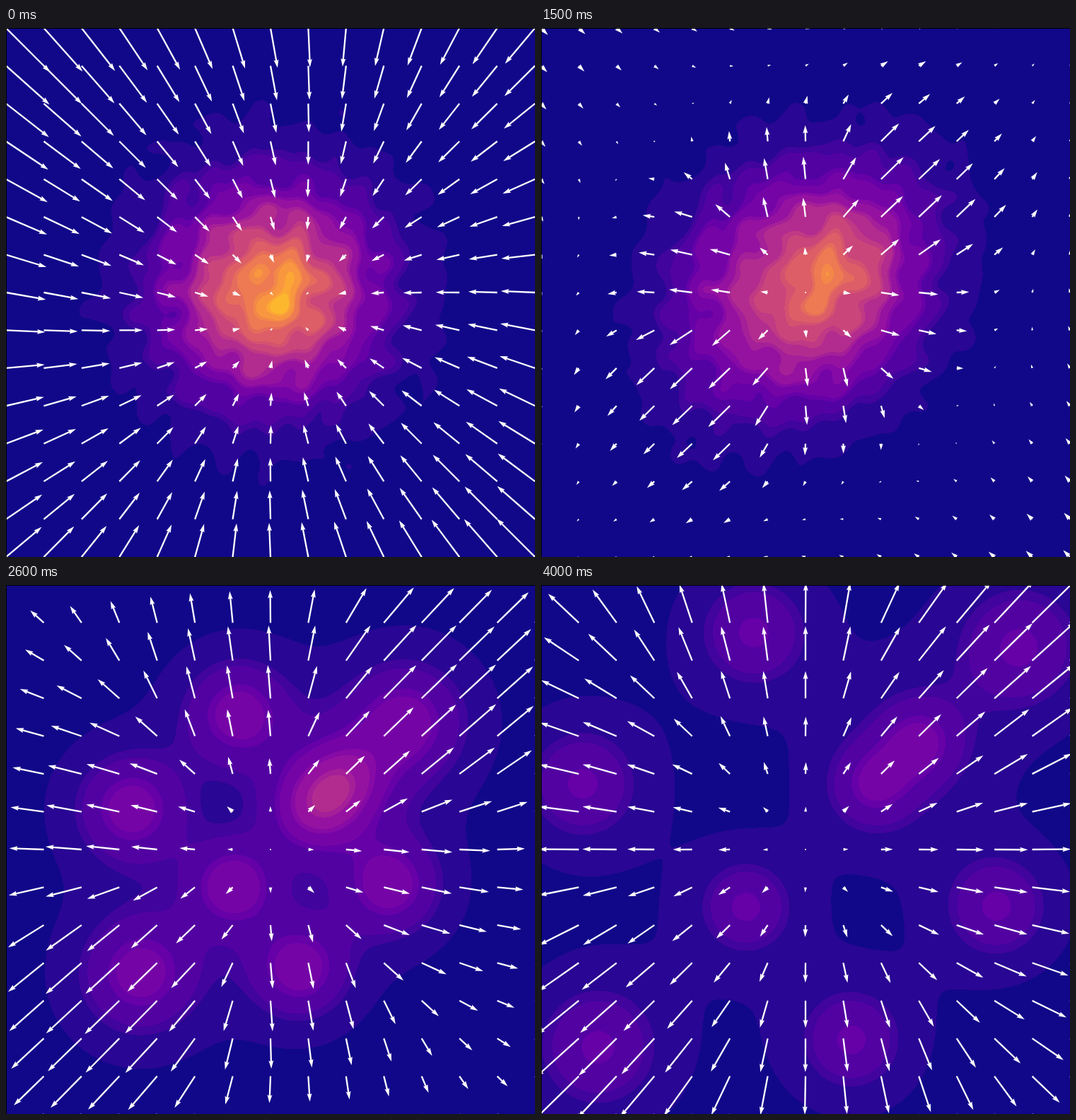
Animation of 748 by 748 pixels, one loop 4.1 s. Source, as an HTML page with a canvas:

```html
<!DOCTYPE html>
<html lang="en">
<head>
<meta charset="utf-8">
<title>Collapse and outflow</title>
<style>
html, body { margin: 0; width: 100%; height: 100%; overflow: hidden; background: #110588; }
canvas { display: block; }
</style>
</head>
<body>
<canvas id="stage" width="748" height="748"></canvas>
<script>
const SIZE = 748, MID = SIZE / 2, CELLS = 14, STEP = SIZE / CELLS;
const LOOP = 4100, TICK = 100, BASE_SIGMA = 48, PEAK = .19;
const { exp, hypot, sqrt, cos, sin, atan2, floor, PI } = Math;
const ctx = document.getElementById('stage').getContext('2d');
const image = ctx.createImageData(SIZE, SIZE);
const pixels = new Uint32Array(image.data.buffer);
const field = new Float32Array(SIZE * SIZE);

// Six evenly turned arms, clockwise from east: radii of the clumps on each
const arms = [[278], [273], [400, 115], [325], [312], [412, 220, 130]].map((radii, i) => {
  const angle = (16.5 + 60 * i) * PI / 180;
  return { radii, angle, x: cos(angle), y: sin(angle) };
});

const clamp = (v, low, high) => Math.max(low, Math.min(high, v));
const lerp = (a, b, f) => a + (b - a) * f;
// Rises to 1 at x = 1, then decays
const pulse = x => x > 0 ? x * exp(1 - x) : 0;

// Distance of the clumps from the centre: fall in, bounce, coast out
const spreadAt = t => hypot(.00027 * t - .07, .08);
const sigmaAt = t => 40 + 8 * spreadAt(t) + 41 / (1 + exp((t - 1350) / 350)) + 9 * exp(-t / 300);

let seed = 11;
function random() {
  seed = (seed * 16807) % 2147483647;
  return seed / 2147483647;
}

function makeNoise() {
  const waves = Array.from({ length: 12 }, () => {
    const angle = random() * PI * 2, k = 2 * PI / (38 + random() * 50);
    return [k * cos(angle), k * sin(angle), random() * 7];
  });
  const bumps = [[385, 392, 1.9], [399, 351, 1.1], [308, 384, .7]];
  return Float32Array.from(field, (_, i) => {
    const x = i % SIZE, y = floor(i / SIZE);
    let n = 0;
    for (const [kx, ky, phase] of waves) n += .36 * sin(kx * x + ky * y + phase);
    for (const [bx, by, peak] of bumps) n += peak * exp(-((x - bx) ** 2 + (y - by) ** 2) / 700);
    return n;
  });
}

const plasma = [0x0d0887, 0x41049d, 0x6a00a8, 0x8f0da4, 0xb12a90, 0xcc4778,
  0xe16462, 0xf2844b, 0xfca636, 0xfcce25, 0xf0f921];

function plasmaPixel(v) {
  const p = clamp(v, 0, 1) * 10, i = Math.min(9, floor(p));
  const channel = shift => Math.round(lerp(plasma[i] >> shift & 255, plasma[i + 1] >> shift & 255, p - i));
  return (255 << 24 | channel(0) << 16 | channel(8) << 8 | channel(16)) >>> 0;
}

// Filled contours: narrow and wide bands alternate above the two lowest levels
function bandValue(v) {
  if (v < .03) return .008;
  if (v < .088) return .054;
  const base = .088 + floor((v - .088) / .0875) * .0875;
  return base + (v - base < .024 ? .012 : .055);
}

const noise = makeNoise();
const bands = Uint32Array.from({ length: 1024 }, (_, i) => plasmaPixel(bandValue(i / 1000)));

function addGlow(x, y, width, height) {
  const bell = center =>
    Float32Array.from({ length: SIZE }, (_, p) => exp(-(((p - center) / width) ** 2) / 2));
  const gx = bell(x), gy = bell(y);
  for (let row = 0, i = 0; row < SIZE; row++) {
    const g = gy[row] * height;
    for (let col = 0; col < SIZE; col++) field[i++] += g * gx[col];
  }
}

function drawDensity(t) {
  const spread = spreadAt(t), sigma = sigmaAt(t), halo = 1 + spread;
  const height = PEAK * (BASE_SIGMA / sigma) ** 2;
  field.fill(0);
  for (const arm of arms) {
    for (const radius of arm.radii) {
      const x = MID + arm.x * radius * spread, y = MID + arm.y * radius * spread;
      const width = sigma * Math.max(.85, sqrt(radius / 300));
      addGlow(x, y, width, height * .75);
      addGlow(x, y, width * halo, height / halo ** 2);
    }
  }
  const rough = .06 * clamp((2300 - t) / 1000, 0, 1);
  for (let i = 0; i < field.length; i++) {
    const v = field[i] + rough * sqrt(field[i]) * noise[i];
    pixels[i] = bands[clamp(floor(v * 1000), 0, 1023)];
  }
  ctx.putImageData(image, 0, 0);
}

function velocity(x, y, t) {
  const r = hypot(x, y), theta = atan2(y, x), spread = spreadAt(t);
  // Infall that turns into expansion, with a pressure kick in the core
  const expansion = .2 - .34 * exp(-t / 3140) + .075 * pulse(t / 600) * exp(-((r / 260) ** 2));
  const shear = -.016, drift = 4 * exp(-t / 400);
  let vx = expansion * x + shear * y + drift;
  let vy = expansion * y + shear * x + drift;

  // Each arm drives its own sector along its axis
  const power = .12 * pulse((t - 400) / 1900) ** 1.7;
  const weights = arms.map(arm => exp(12 * cos(theta - arm.angle)));
  const total = weights.reduce((a, b) => a + b);
  arms.forEach((arm, i) => {
    const reach = arm.radii[0];
    const push = power * reach * pulse((r / (reach * spread + 40)) ** 2) * weights[i] / total;
    vx += arm.x * push;
    vy += arm.y * push;
  });
  return [vx, vy];
}

function drawArrow(x, y, vx, vy) {
  const length = hypot(vx, vy), w = 2.3 * Math.min(1, length / 11.5), half = w / 2;
  ctx.save();
  ctx.translate(x, y);
  ctx.rotate(atan2(vy, vx));
  ctx.beginPath();
  if (length < 2) {
    ctx.arc(0, 0, 1, 0, 7);
  } else {
    const neck = length - 4.5 * w, barb = length - 5 * w;
    ctx.moveTo(0, -half);
    ctx.lineTo(neck, -half);
    ctx.lineTo(barb, -3 * half);
    ctx.lineTo(length, 0);
    ctx.lineTo(barb, 3 * half);
    ctx.lineTo(neck, half);
    ctx.lineTo(0, half);
  }
  ctx.fill();
  ctx.restore();
}

function drawFlow(t) {
  ctx.fillStyle = '#fff';
  for (let row = 0; row <= CELLS; row++) {
    for (let col = 0; col <= CELLS; col++) {
      const x = col * STEP, y = row * STEP;
      drawArrow(x, y, ...velocity(x - MID, y - MID, t));
    }
  }
}

let shown = -1;
function render() {
  const t = floor(performance.now() % LOOP / TICK) * TICK;
  if (t !== shown) {
    shown = t;
    drawDensity(t);
    drawFlow(t);
    ctx.fillStyle = '#000';
    ctx.fillRect(0, 0, SIZE, 1);
    ctx.fillRect(0, 0, 1, SIZE);
  }
  requestAnimationFrame(render);
}
render();
</script>
</body>
</html>
```
